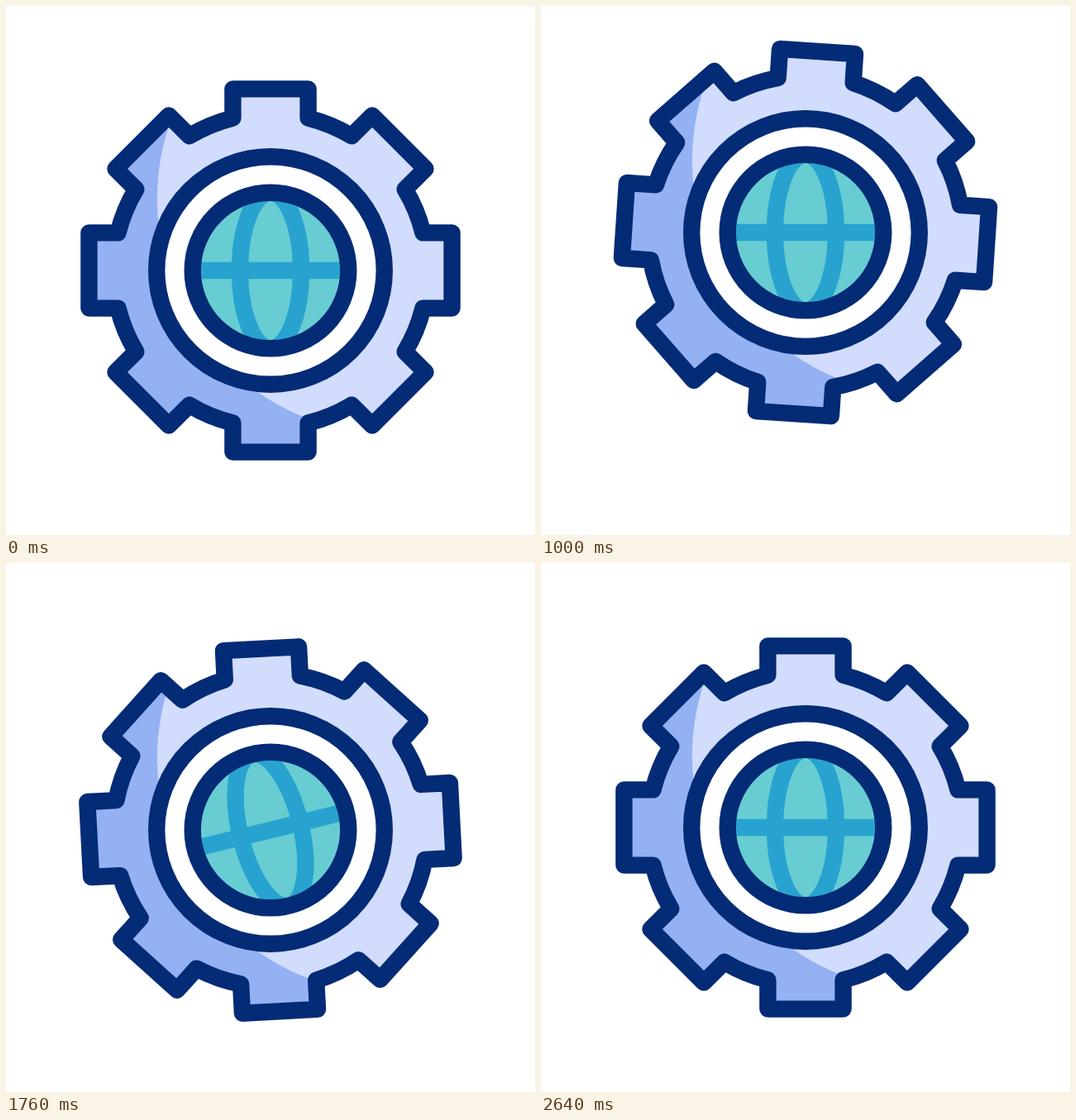
Animation, 640 px wide and 640 px high, one loop 2820 ms. Source, as an HTML page with a canvas:

```html
<!DOCTYPE html>
<html lang="en">
<head>
<meta charset="utf-8">
<title>Spinning gear with globe</title>
<style>
  html, body { margin: 0; width: 100%; height: 100%; overflow: hidden; background: #fff; }
  canvas { display: block; width: 640px; height: 640px; }
</style>
</head>
<body>
<canvas id="stage" width="640" height="640"></canvas>
<script>
const ctx = document.getElementById('stage').getContext('2d');
const LOOP = 2820, STEP = 20, LINE = 20.4, TAU = Math.PI * 2;
const NAVY = '#042b76', LIGHT = '#d2dcfd', SHADE = '#94b1f3';
const TEAL = '#67cdd2', BLUE = '#28a3d0';

// [time in ms, value]
const BOUNCE = [[200, 0], [320, 51], [895, -62], [1297, 33], [1656, -22],
                [1834, 18], [2270, -16.4], [2640, 0]];
const TURN = [[200, 0], [680, 41], [1000, 93.8], [1400, 158],
              [1760, 222], [2040, 277.4], [2640, 360]];
const SPIN = [[1241, 0], [1829, 360]];

const rad = deg => deg * Math.PI / 180;

function slope(keys, i) {
  if (i === 0 || i === keys.length - 1) return 0;
  const [t0, v0] = keys[i - 1], [t1, v1] = keys[i + 1];
  return (v1 - v0) / (t1 - t0);
}

// Cubic Hermite track: rests at each key, or flows through it when smooth
function track(keys, t, smooth) {
  const last = keys.length - 1;
  if (t <= keys[0][0]) return keys[0][1];
  if (t >= keys[last][0]) return keys[last][1];
  const i = keys.findIndex(k => k[0] > t) - 1;
  const [t0, v0] = keys[i], [t1, v1] = keys[i + 1];
  const d = t1 - t0, x = (t - t0) / d;
  let v = v0 + (v1 - v0) * x * x * (3 - 2 * x);
  if (smooth) {
    v += d * slope(keys, i) * x * (1 - x) ** 2;
    v -= d * slope(keys, i + 1) * x * x * (1 - x);
  }
  return v;
}

function gearPath(angle) {
  const half = 45.6, top = 219.6, body = 190;
  const base = Math.sqrt(body * body - half * half);
  const edge = Math.asin(half / body);
  ctx.save();
  ctx.rotate(angle);
  ctx.beginPath();
  for (let i = 0; i < 8; i++) {
    ctx.lineTo(-half, -base);
    ctx.lineTo(-half, -top);
    ctx.lineTo(half, -top);
    ctx.lineTo(half, -base);
    ctx.arc(0, 0, body, -Math.PI / 2 + edge, -Math.PI / 4 - edge);
    ctx.rotate(Math.PI / 4);
  }
  ctx.closePath();
  ctx.restore();
}

function paint(fill, stroke) {
  if (fill) { ctx.fillStyle = fill; ctx.fill(); }
  if (stroke) { ctx.strokeStyle = stroke; ctx.stroke(); }
}

function disc(r, fill, stroke) {
  ctx.beginPath();
  ctx.arc(0, 0, r, 0, TAU);
  paint(fill, stroke);
}

function drawGear(angle) {
  gearPath(angle);
  paint(SHADE);
  ctx.save();
  ctx.clip();
  ctx.beginPath();
  ctx.ellipse(133.5, -79, 268.5, 278, rad(-28), 0, TAU);
  paint(LIGHT);
  ctx.restore();
  gearPath(angle);
  paint(null, NAVY);
  disc(137.8, '#fff', NAVY);
}

function drawGlobe(angle) {
  disc(94.3, TEAL);
  ctx.save();
  ctx.clip();
  ctx.rotate(angle);
  ctx.beginPath();
  ctx.ellipse(0, 0, 37, 94.3, 0, 0, TAU);
  ctx.moveTo(-94, 0);
  ctx.lineTo(94, 0);
  paint(null, BLUE);
  ctx.restore();
  disc(94.3, null, NAVY);
}

function draw(t) {
  ctx.fillStyle = '#fff';
  ctx.fillRect(0, 0, 640, 640);
  ctx.lineWidth = LINE;
  ctx.lineJoin = 'round';
  ctx.save();
  ctx.translate(320, 320 + track(BOUNCE, t));
  drawGear(rad(track(TURN, t, true)));
  drawGlobe(rad(track(SPIN, t)));
  ctx.restore();
}

const start = performance.now();
function tick(now) {
  const t = Math.max(0, now - start) % LOOP;
  draw(Math.floor(t / STEP) * STEP);
  requestAnimationFrame(tick);
}
draw(0);
requestAnimationFrame(tick);
</script>
</body>
</html>
```
